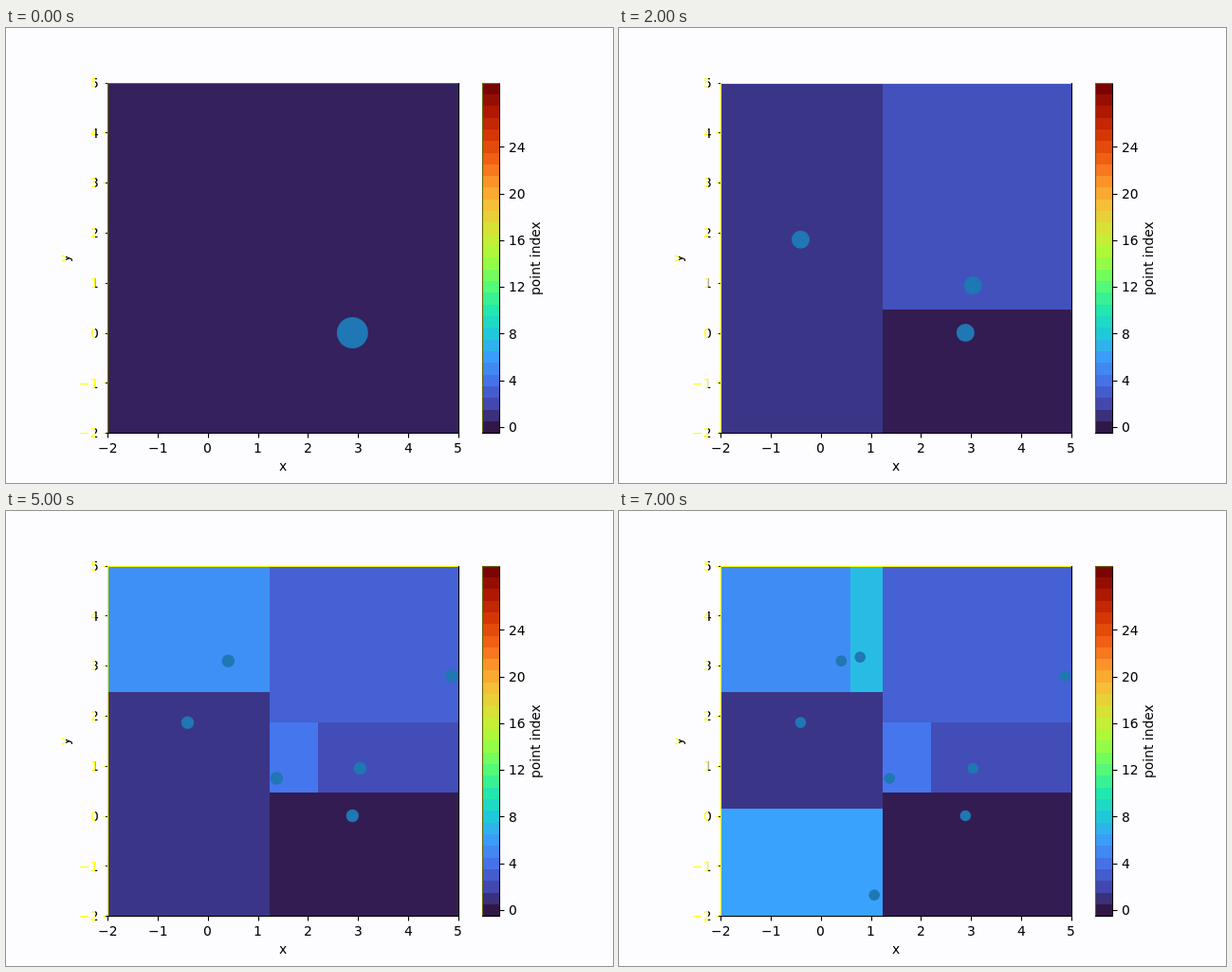
An HTML page with a canvas that plays this animation: 640x480 px, repeating every 8000 ms.

```html
<!DOCTYPE html>
<html lang="en">
<head>
<meta charset="utf-8">
<title>Growing partition</title>
<style>
html, body { margin: 0; width: 100%; height: 100%; overflow: hidden; background: #fdfdff; }
canvas { display: block; }
</style>
</head>
<body>
<canvas id="stage" width="640" height="480"></canvas>
<script>
const ctx = document.getElementById('stage').getContext('2d');
const STEP = 1000;
const UNIT = 52.8;
const PLOT = { l: 107.2, t: 57.6, r: 476.8, b: 427.2 };
const BAR = { l: 502, r: 520, levels: 30 };
const YELLOW = '#ffff00';
const OLIVE = '#66660a';

const points = [
  [365.3, 321.5], [191.5, 223.2], [373.3, 271.5], [470.3, 174],
  [285.3, 282], [234.3, 158.2], [269.2, 405.2], [254.2, 154.2]
];

const ramp = ['311748', '434ab4', '4675ed', '39a2fc', '1bcfd4', '24eca6', '61fc6c',
  'a4fc3b', 'd1e834', 'f3c63a', 'fe9b2d', 'f36315', 'd93806', 'b11901', '7a0403']
  .map(hex => [0, 2, 4].map(i => parseInt(hex.slice(i, i + 2), 16)));

function shade(index) {
  const t = index / (BAR.levels - 1) * (ramp.length - 1);
  const i = Math.min(Math.floor(t), ramp.length - 2);
  const rgb = ramp[i].map((c, k) => Math.round(c + (ramp[i + 1][k] - c) * (t - i)));
  return `rgb(${rgb})`;
}

// Centre of the pixel nearest to v, for crisp lines.
const snap = v => Math.round(v) + 0.5;

// Each new point halves the cell it lands in, along the axis of greater distance.
function partition(count) {
  const cells = [{ min: [108, 58], max: [477, 428] }];
  for (let n = 1; n < count; n++) {
    const p = points[n];
    const k = cells.findIndex(c => [0, 1].every(a => p[a] >= c.min[a] && p[a] <= c.max[a]));
    const old = cells[k], q = points[k];
    const axis = Math.abs(p[1] - q[1]) >= Math.abs(p[0] - q[0]) ? 1 : 0;
    const cut = Math.round((p[axis] + q[axis]) / 2);
    const fresh = { min: [...old.min], max: [...old.max] };
    const [low, high] = p[axis] < q[axis] ? [fresh, old] : [old, fresh];
    low.max[axis] = cut;
    high.min[axis] = cut;
    cells.push(fresh);
  }
  return cells;
}

function line(x1, y1, x2, y2, color = '#000') {
  ctx.strokeStyle = color;
  ctx.lineWidth = 1.1;
  ctx.beginPath();
  ctx.moveTo(x1, y1);
  ctx.lineTo(x2, y2);
  ctx.stroke();
}

// share: part of the width that lies left of x.
function text(str, x, y, share, fill = '#000') {
  const left = Math.round(x - ctx.measureText(str).width * share);
  ctx.fillStyle = fill;
  ctx.fillText(str, left, Math.round(y));
}

function upright(str, x, y, fill) {
  ctx.save();
  ctx.translate(x, y);
  ctx.rotate(-Math.PI / 2);
  text(str, 0, 0, 0.5, fill);
  ctx.restore();
}

function twoTone(x1, y1, x2, y2) {
  const g = ctx.createLinearGradient(x1, y1, x2, y2);
  g.addColorStop(0.5, YELLOW);
  g.addColorStop(0.5, '#000');
  return g;
}

function drawCells(count) {
  ctx.save();
  ctx.beginPath();
  ctx.rect(107, 58, 370, 370);
  ctx.clip();
  partition(count).forEach(({ min, max }, i) => {
    ctx.fillStyle = shade(i + (i === count - 1 ? 0.4 : 0.2));
    ctx.fillRect(min[0], min[1], max[0] - min[0], max[1] - min[1]);
  });
  ctx.fillStyle = '#1f77b4';
  for (const [x, y] of points.slice(0, count)) {
    ctx.beginPath();
    ctx.arc(x, y, 16.5 / Math.sqrt(count), 0, Math.PI * 2);
    ctx.fill();
  }
  ctx.restore();
}

function drawAxes(count) {
  const edge = count > 1 ? YELLOW : OLIVE;
  line(107.5, 58, 107.5, 428, edge);
  line(107, 58.5, 477, 58.5, edge);
  line(477.5, 58, 477.5, 428);
  line(107, 427.5, 478, 427.5);
  for (let v = -2; v <= 5; v++) {
    const label = String(v).replace('-', '\u2212');
    const x = PLOT.l + (v + 2) * UNIT;
    const y = PLOT.b - (v + 2) * UNIT;
    line(snap(x), 428, snap(x), 432.5);
    text(label, x, 448, 0.5);
    line(102.5, snap(y), 107, snap(y), twoTone(102, 0, 108, 0));
    text(label, 97.5, y + 5.2, 1, twoTone(89, 0, 98, 0));
  }
  text('x', 292, 467, 0.5);
  upright('y', 67, 243, twoTone(0, -8, 0, 0));
}

function drawBar() {
  const h = (PLOT.b - PLOT.t) / BAR.levels;
  for (let i = 0; i < BAR.levels; i++) {
    const top = Math.round(PLOT.b - (i + 1) * h);
    const bottom = Math.round(PLOT.b - i * h);
    ctx.fillStyle = shade(i);
    ctx.fillRect(BAR.l, top, BAR.r - BAR.l, bottom - top);
  }
  line(502.5, 58, 502.5, 428, OLIVE);
  line(520.5, 58, 520.5, 428);
  line(502, 427.5, 521, 427.5);
  line(502, 58.5, 521, 58.5, OLIVE);
  for (let v = 0; v <= 24; v += 4) {
    const y = PLOT.b - (v + 0.5) * h;
    line(521, snap(y), 525.5, snap(y));
    text(String(v), 530, y + 5.2, 0);
  }
  upright('point index', 563, 243);
}

function draw(now) {
  const count = Math.floor(now / STEP) % points.length + 1;
  ctx.fillStyle = '#fdfdff';
  ctx.fillRect(0, 0, 640, 480);
  ctx.font = '13.89px "DejaVu Sans", sans-serif';
  drawCells(count);
  drawAxes(count);
  drawBar();
}

const start = performance.now();
function tick() {
  draw(performance.now() - start);
  requestAnimationFrame(tick);
}
tick();
</script>
</body>
</html>
```
